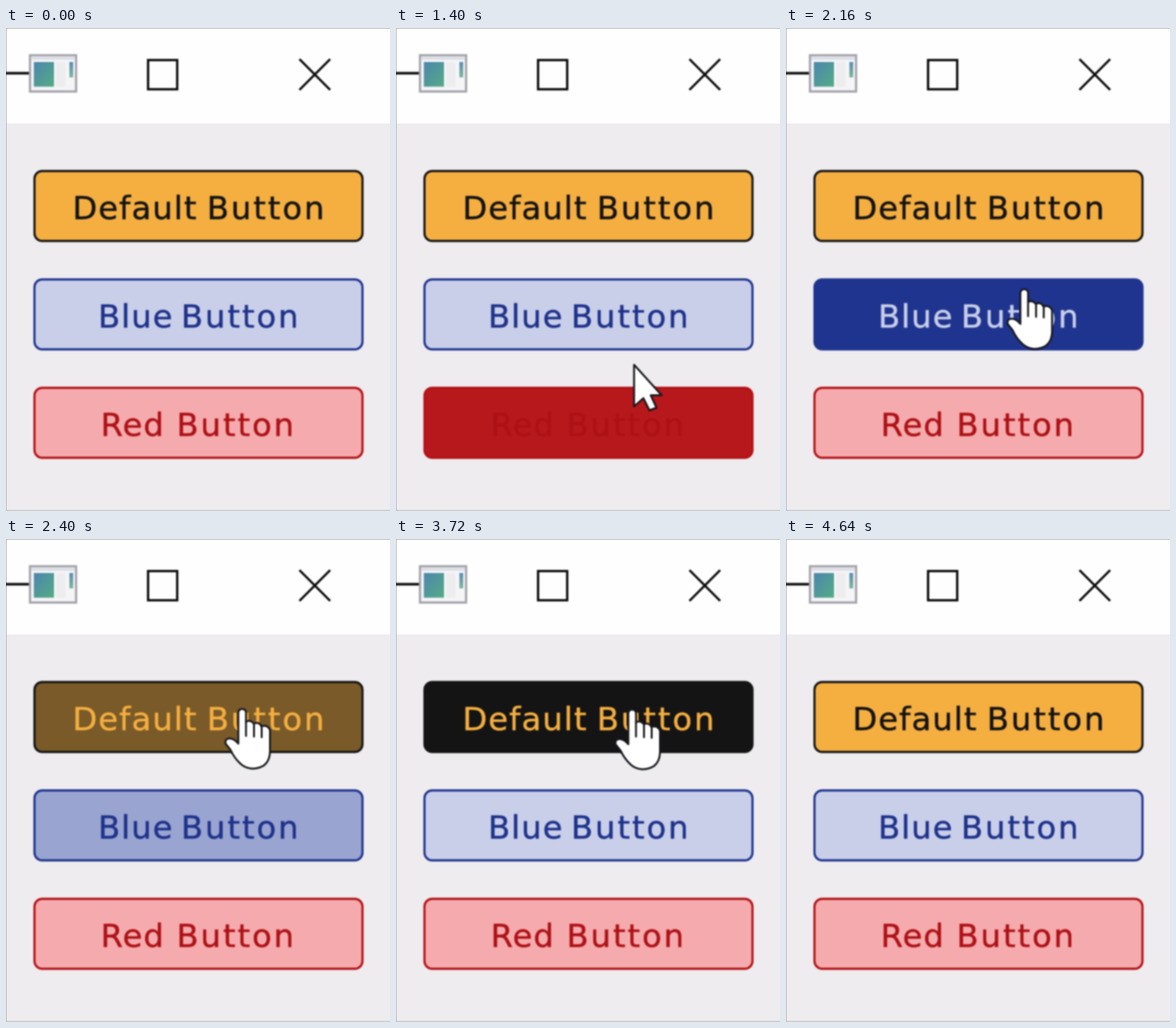
Animation of 600x753 px, one loop 4680 ms. Source, as an HTML page:

```html
<!DOCTYPE html>
<html lang="en">
<head>
<meta charset="utf-8">
<title>Animated buttons</title>
<style>
  html, body { margin: 0; width: 100%; height: 100%; overflow: hidden; background: #eeecee; }
  svg { display: block; width: 100vw; height: 100vh; }
  text { font: 50px "DejaVu Sans", Verdana, sans-serif; letter-spacing: 1.8px; stroke-width: .6px; }
  .second { letter-spacing: 3.2px; }
  .soft { filter: blur(.8px); }
</style>
</head>
<body>
<svg viewBox="0 0 600 753" preserveAspectRatio="none">
  <defs>
    <linearGradient id="pane" x1="0" y1="0" x2="1" y2="1">
      <stop offset="0" stop-color="#4c86ad"/>
      <stop offset="1" stop-color="#55ab84"/>
    </linearGradient>
    <linearGradient id="strip" x1="0" y1="0" x2="0" y2="1">
      <stop offset="0" stop-color="#5b8fb5"/>
      <stop offset="1" stop-color="#7cb89c"/>
    </linearGradient>
  </defs>
  <rect width="600" height="753" fill="#eeecee"/>
  <rect width="600" height="149" fill="#fefefe"/>
  <path d="M0 .5H600M.5 0V753M0 752H600" stroke="#b0afb1" fill="none"/>

  <g class="soft">
    <path d="M-4 70.500H36" stroke="#0c0c0c" stroke-width="4"/>
    <rect x="37.500" y="42.500" width="72" height="56.500" fill="#f5f5f8" stroke="#a3a3aa" stroke-width="3.500"/>
    <path d="M40 47H108" stroke="#dcdee6" stroke-width="5"/>
    <rect x="43.500" y="53" width="31.500" height="38.500" fill="url(#pane)"/>
    <rect x="78" y="53" width="15" height="38.500" fill="#ededf0"/>
    <rect x="99" y="53" width="6" height="24" fill="url(#strip)"/>

    <rect x="222" y="50" width="45.500" height="45.500" fill="none" stroke="#080808" stroke-width="3.600"/>
    <path d="M458.500 48.500L506.500 96.500M506.500 48.500L458.500 96.500" stroke="#0c0c0c" stroke-width="3.600"/>
  </g>

  <g id="buttons" class="soft"></g>

  <g class="soft">
    <g id="cursor" stroke="#17171d" stroke-width="3" stroke-linejoin="round" stroke-linecap="round" fill="#fff">
      <path id="arrow" d="M1 1V66L15.500 53L25 72L36 68L27 48.500H44Z"/>
      <g id="hand">
        <path d="M-6 50V4Q-5-1 0-1Q5-1 6 4V19Q13 15 18 22Q26 18 30 26Q40 23 43.500 32V66Q43 80 34 87Q26 92 15 92Q3 91-5 82Q-13 74-18 63L-26 53Q-27 44-18 45Q-12 46-6 53Z"/>
        <path fill="none" d="M6 19V41M18.500 22V42M30.500 27V43"/>
      </g>
    </g>
  </g>
</svg>
<script>
const LOOP = 4680, STEP = 40, FADE = 300;

// x: left edge of each word; enter and leave: when the pointer crosses the edge
const buttons = [
  { words: ["Default", "Button"], x: [104, 314], y: 222, light: [245, 175, 65], dark: [20, 20, 20], enter: 2235, leave: 3900 },
  { words: ["Blue", "Button"], x: [144, 273.5], y: 391, light: [201, 207, 233], dark: [31, 52, 143], enter: 1520, leave: 2184 },
  { words: ["Red", "Button"], x: [148, 266.5], y: 560, light: [245, 171, 174], dark: [179, 18, 22], enter: 664, leave: 1388 }
];

// pointer path: time, x, y
const path = [
  [520, 398, 772], [664, 398, 671], [720, 397, 655], [840, 396, 637], [1120, 396, 636],
  [1388, 375, 560], [1400, 371, 524], [1520, 371, 502], [1760, 373, 470], [2080, 373, 466],
  [2184, 372, 391], [2235, 371, 333], [2400, 369, 266], [3740, 369, 267],
  [3840, 470, 275], [3900, 558, 282], [3960, 580, 285], [4040, 615, 288]
];

const $ = id => document.getElementById(id);
const clamp = v => Math.max(0, Math.min(1, v));
const mix = (a, b, k) => a + (b - a) * k;
const rgb = c => `rgb(${c.map(Math.round).join()})`;
const show = (el, on) => el.setAttribute("visibility", on ? "visible" : "hidden");

function add(parent, tag, attrs) {
  const el = document.createElementNS("http://www.w3.org/2000/svg", tag);
  for (const key in attrs) el.setAttribute(key, attrs[key]);
  return parent.appendChild(el);
}

for (const b of buttons) {
  b.box = add($("buttons"), "rect", {
    x: 44.5, y: b.y + 1, width: 512.5, height: 109, rx: 12,
    stroke: rgb(b.dark), "stroke-width": 3.4
  });
  b.text = add($("buttons"), "text", { y: b.y + 76 });
  b.words.forEach((word, i) => {
    const span = add(b.text, "tspan", { x: b.x[i], class: i ? "second" : "first" });
    span.textContent = word;
  });
}

function pointerAt(t) {
  const i = path.findIndex(p => p[0] > t);
  if (i < 1) return null;
  const a = path[i - 1], b = path[i], k = (t - a[0]) / (b[0] - a[0]);
  return [mix(a[1], b[1], k), mix(a[2], b[2], k)];
}

function draw(t) {
  let over = false;
  for (const b of buttons) {
    const hover = t >= b.enter && t < b.leave;
    const k = clamp((t - b.enter) / FADE) - clamp((t - b.leave) / FADE);
    b.box.setAttribute("fill", rgb(b.light.map((v, i) => mix(v, b.dark[i], k))));
    // the label switches at once while the fill fades
    const ink = rgb(hover ? b.light : b.dark.map(v => v * 0.97));
    b.text.setAttribute("fill", ink);
    b.text.setAttribute("stroke", ink);
    over = over || hover;
  }
  const pos = pointerAt(t);
  if (pos) $("cursor").setAttribute("transform", `translate(${pos})`);
  show($("hand"), pos && over);
  show($("arrow"), pos && !over);
}

const start = performance.now();
function tick() {
  const t = (performance.now() - start) % LOOP;
  draw(Math.floor(t / STEP) * STEP);
  requestAnimationFrame(tick);
}
tick();
</script>
</body>
</html>
```
